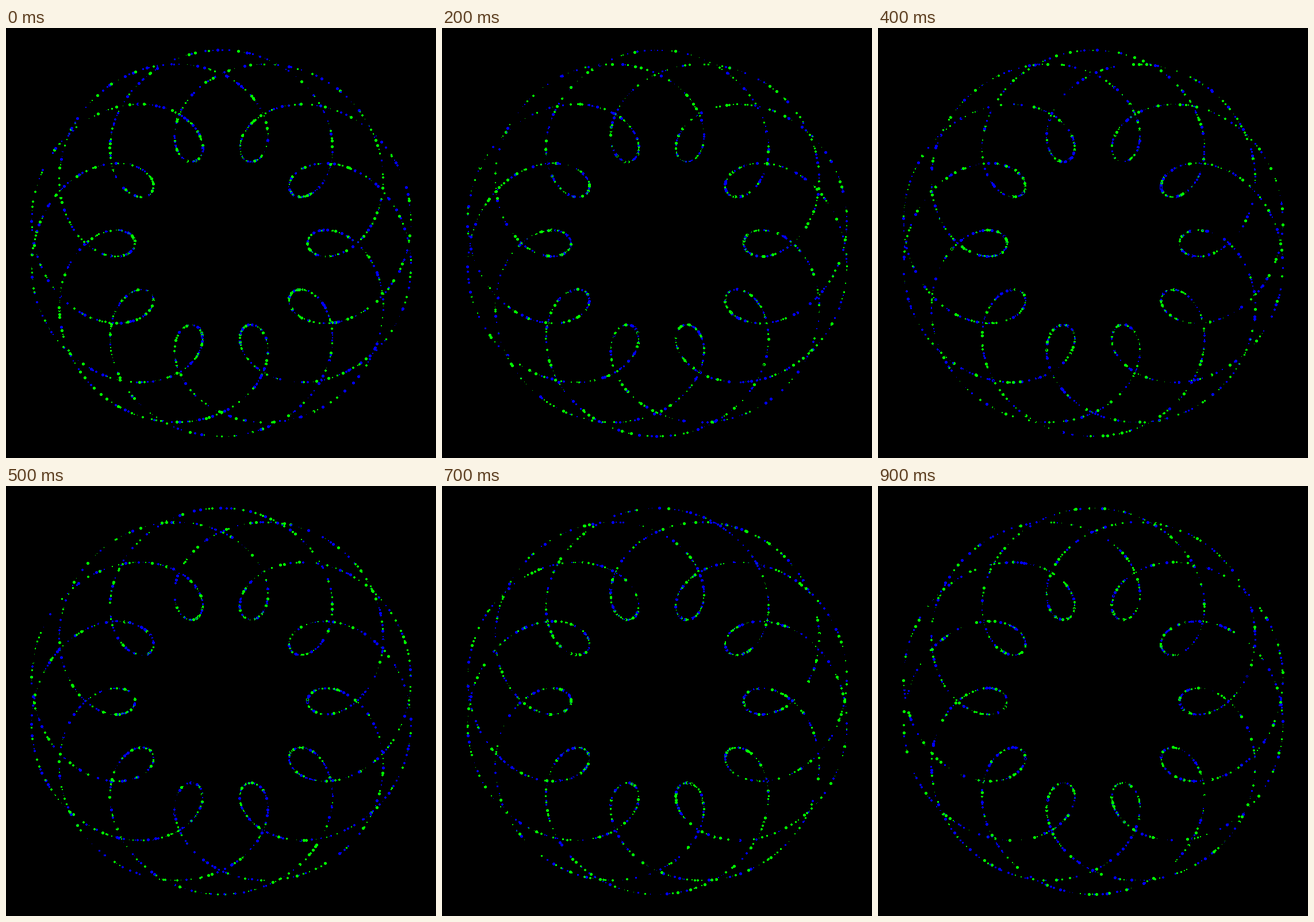
Animation of 748 by 748 pixels, one loop 1000 ms. Source, as an HTML page with a canvas:

```html
<!DOCTYPE html>
<html lang="en">
<head>
<meta charset="utf-8">
<title>Sparkling epitrochoid</title>
<style>
  html, body { margin: 0; width: 100%; height: 100%; overflow: hidden; background: #000; }
  canvas { display: block; width: 748px; height: 748px; }
</style>
</head>
<body>
<canvas id="stage" width="748" height="748"></canvas>
<script>
const ctx = document.getElementById('stage').getContext('2d');
const SIZE = 748, MID = SIZE / 2;
const STEP = 100, STEPS = 10;
const BIG = 243, SMALL = 93;
const DOTS = 2000;
const COLORS = ['#0f0', '#00f', '#000'];

// Small seeded generator, so each step always looks the same
function seeded(seed) {
  let s = seed >>> 0;
  return () => {
    s = (s + 0x6d2b79f5) >>> 0;
    let v = Math.imul(s ^ (s >>> 15), s | 1);
    v ^= v + Math.imul(v ^ (v >>> 7), v | 61);
    return ((v ^ (v >>> 14)) >>> 0) / 4294967296;
  };
}

// Hard-edged dot, d pixels wide, with clipped corners from 4 px up
function dot(x, y, d) {
  const left = Math.round(x - d / 2 + 0.5);
  const top = Math.round(y - d / 2 + 0.5);
  if (d < 4) {
    ctx.fillRect(left, top, d, d);
  } else {
    ctx.fillRect(left + 1, top, d - 2, d);
    ctx.fillRect(left, top + 1, d, d - 2);
  }
}

function draw(step) {
  const rand = seeded(7919 * (step + 1));
  ctx.fillStyle = '#000';
  ctx.fillRect(0, 0, SIZE, SIZE);
  for (let i = 0; i < DOTS; i++) {
    const t = (i + rand()) / DOTS * 2 * Math.PI;
    const x = MID + BIG * Math.cos(3 * t) - SMALL * Math.cos(13 * t);
    const y = MID + BIG * Math.sin(3 * t) - SMALL * Math.sin(13 * t);
    ctx.fillStyle = COLORS[Math.floor(rand() * COLORS.length)];
    dot(x, y, 1 + Math.floor(rand() * 5));
  }
}

const start = performance.now();
let shown = -1;

function tick() {
  const step = Math.floor((performance.now() - start) / STEP) % STEPS;
  if (step !== shown) {
    shown = step;
    draw(step);
  }
  requestAnimationFrame(tick);
}
tick();
</script>
</body>
</html>
```
